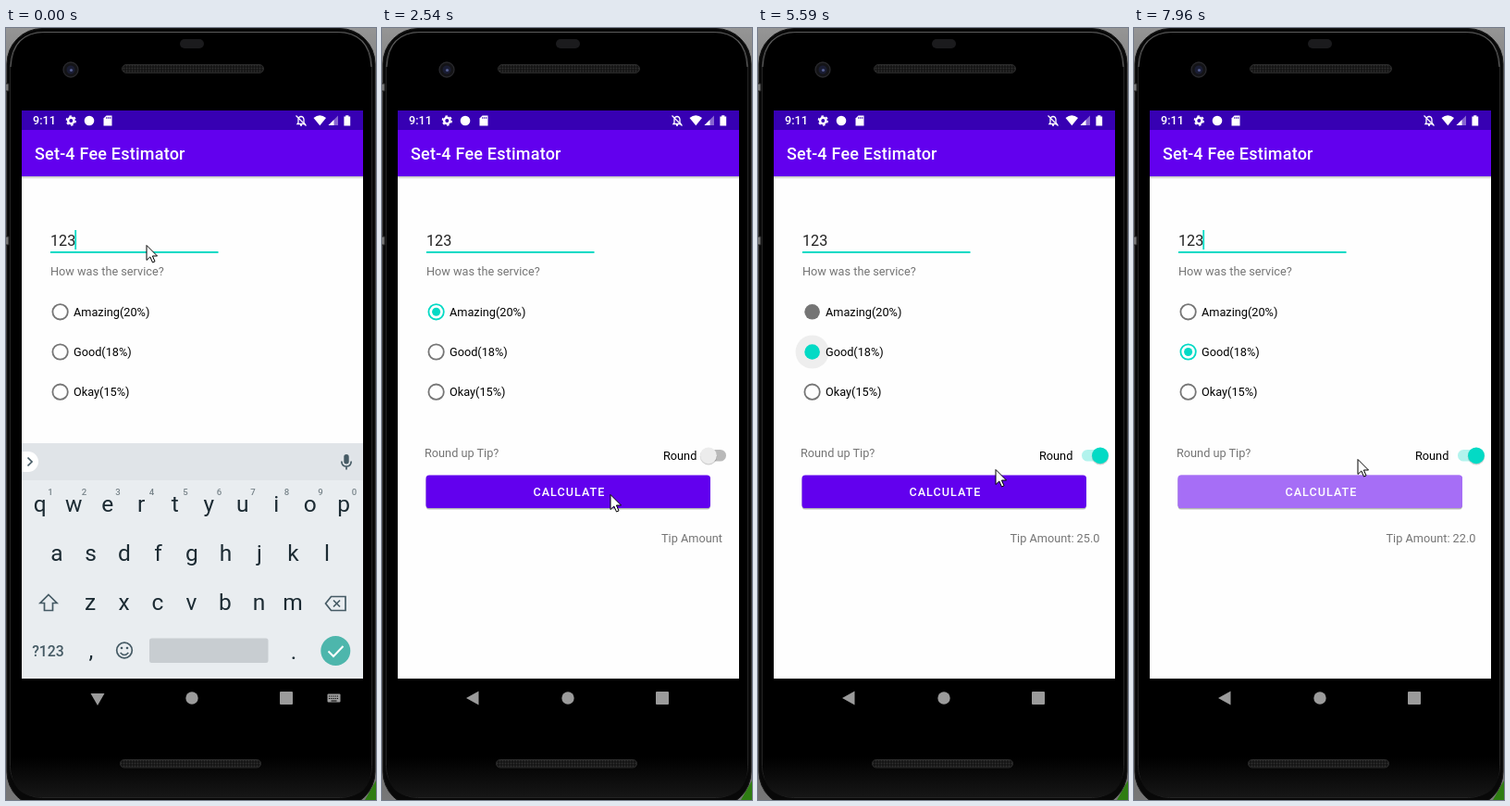
Animation, 400 px wide and 833 px high, one loop 8 s. Source, as an HTML page:

```html
<!DOCTYPE html>
<html lang="en">
<head>
<meta charset="utf-8">
<title>Tip form</title>
<style>
html, body { margin: 0; width: 100%; height: 100%; overflow: hidden; background: #000; }
svg { display: block; width: 100%; height: 100%; font-family: Roboto, "Noto Sans", sans-serif; }
.body { font-size: 12.72px; }
.soft { fill: #757575; }
.line { fill: none; stroke: #455a64; stroke-width: 1.7; }
.key { font-size: 24.5px; fill: #1c2b33; text-anchor: middle; }
.hint { font-size: 9.6px; font-weight: 500; fill: #78848a; text-anchor: middle; }
</style>
</head>
<body>
<svg viewBox="0 0 400 833" preserveAspectRatio="none">
  <defs>
    <linearGradient id="edge" x2="0" y2="1">
      <stop offset="0" stop-color="#959595"/><stop offset=".12" stop-color="#707070"/>
      <stop offset=".8" stop-color="#5c5c5c"/><stop offset="1" stop-color="#777"/>
    </linearGradient>
    <linearGradient id="chin" x2="0" y2="1">
      <stop offset=".5" stop-color="#000"/><stop offset="1" stop-color="#161616"/>
    </linearGradient>
    <linearGradient id="drop" x2="0" y2="1">
      <stop offset="0" stop-opacity=".26"/><stop offset="1" stop-opacity="0"/>
    </linearGradient>
    <pattern id="mesh" width="3" height="3" patternUnits="userSpaceOnUse">
      <rect width="3" height="3" fill="#141414"/><circle cx="1.5" cy="1.5" r=".9" fill="#303030"/>
    </pattern>
    <clipPath id="screen"><rect x="17" y="89" width="369" height="613"/></clipPath>
  </defs>

  <g id="phone">
    <rect width="400" height="833" fill="url(#edge)"/>
    <path d="M388 833L400 812V833Z" fill="#2f7d12"/>
    <rect x="1" y=".5" width="398" height="840" rx="38" fill="#080808" stroke="#161616"/>
    <rect x="4.5" y="4.5" width="391" height="826" rx="34" fill="#000" stroke="#242424"/>
    <path d="M5 42Q7 4.500 42 4.500H358Q393 4.500 395 42" fill="none" stroke="#5a5a5a" stroke-width="1.200"/>
    <path d="M5.5 743H395V797Q395 830 362 830H38Q5.5 830 5.5 797Z" fill="url(#chin)"/>
    <path d="M0 60h3v8H0M0 225h3v9H0" fill="#777" stroke="#222"/>
    <rect x="188" y="12" width="26" height="10" rx="5" fill="#1b1b1d"/>
    <rect x="125.500" y="39.500" width="153" height="9" rx="4.5" fill="url(#mesh)" stroke="#2b2b2b"/>
    <rect x="123.500" y="789.500" width="152" height="8.500" rx="4.2" fill="url(#mesh)" stroke="#2b2b2b"/>
    <circle cx="70" cy="45" r="8" fill="#141417" stroke="#29292d" stroke-width="1.300"/>
    <circle cx="70" cy="45" r="4.500" fill="#1a1d33"/><circle cx="70.500" cy="45.500" r="1.600" fill="#555f92"/>
  </g>

  <g clip-path="url(#screen)">
    <rect x="17" y="89" width="369" height="613" fill="#fefefe"/>
    <rect x="17" y="160" width="369" height="3" fill="url(#drop)"/>
    <rect x="17" y="110" width="369" height="50" fill="#6200ee"/>
    <rect x="17" y="89" width="369" height="21" fill="#3700b3"/>
    <text x="31" y="142" font-size="18" font-weight="500" letter-spacing=".22" fill="#fff">Set-4 Fee Estimator</text>

    <g id="status" fill="#fff">
      <text x="29" y="104.300" font-size="12.6" font-weight="500">9:11</text>
      <circle cx="70.300" cy="100" r="3.200" fill="none" stroke="#fff" stroke-width="2.400"/>
      <circle cx="70.300" cy="100" r="4.900" fill="none" stroke="#fff" stroke-width="1.500" stroke-dasharray="2.500 2.630"/>
      <circle cx="90" cy="100" r="5.300"/>
      <path d="M108.500 94.500H114.500V105.500H105.500V97.500Z"/>
      <path d="M108.800 96v2M110.800 96v2M112.800 96v2" stroke="#3700b3" stroke-width=".9"/>
      <path d="M315 103.500H323L322 102V98.500Q321.500 95.500 319 95.500T316 98.500V102ZM318 105h2" fill="none" stroke="#fff" stroke-width="1.300"/>
      <path d="M313.500 94.500L324.500 105.500" stroke="#fff" stroke-width="1.300"/>
      <path d="M332.500 97Q339.300 91.500 346 97L339.300 105.200Z"/>
      <path d="M359 94.500V105H348.500Z" opacity=".4"/><path d="M354.500 99V105H348.500Z"/>
      <path d="M367.200 94.200h3.200v1.200h1.800V105.500h-6.800V95.400h1.800Z"/>
    </g>

    <text x="48" y="235" font-size="16.2" fill="#212121">123</text>
    <path id="caret" d="M75.200 218V239" stroke="#03dac5" stroke-width="1.800"/>
    <path d="M48 242H229.500" stroke="#03dac5" stroke-width="2"/>
    <text class="body soft" x="48" y="266.800">How was the service?</text>
    <g id="radios"></g>

    <text class="body soft" x="46" y="463">Round up Tip?</text>
    <text class="body" x="304" y="466">Round</text>
    <circle id="switchRipple" cy="461.500" r="18" fill="#03dac5"/>
    <rect id="track" x="350" y="455" width="22" height="12.600" rx="6.300"/>
    <circle id="thumbShade" cy="462.200" r="9.200" opacity=".18"/>
    <circle id="thumb" cy="461.300" r="8.900"/>

    <rect x="47.500" y="485" width="307.500" height="35" rx="4" opacity=".12"/>
    <rect x="47.500" y="484" width="307.500" height="35" rx="3.600" opacity=".2"/>
    <rect x="47.500" y="482.500" width="307.500" height="35.500" rx="3.600" fill="#6200ee"/>
    <rect id="flash" x="47.500" y="482.500" width="307.500" height="35.500" rx="3.600" fill="#fff"/>
    <text x="202.400" y="505.200" font-size="12.57" font-weight="500" letter-spacing="1.02" fill="#fff" text-anchor="middle">CALCULATE</text>
    <text class="body soft" id="tip" y="555"></text>
    <g id="keyboard"></g>
  </g>

  <g id="nav" fill="#9b9b9b">
    <path id="back"/>
    <circle cx="201" cy="723" r="6.700"/>
    <rect x="296" y="716" width="14" height="14" rx="1"/>
    <g id="imeIcon">
      <rect x="347.500" y="718.500" width="14" height="9" rx="1"/>
      <path d="M349 721h11M349 723.500h11" stroke="#000" stroke-width="1.100" stroke-dasharray="1.200 1"/>
      <path d="M351.500 726h6" stroke="#000"/>
    </g>
  </g>
  <path id="cursor" d="M0 .5V16.500L3.800 13 6.500 19 9 17.900 6.400 12H11.500Z" fill="#fff" stroke="#000" stroke-linejoin="round"/>
</svg>

<script>
const LOOP = 8000;
const TEAL = [3, 218, 197];
const $ = id => document.getElementById(id);
const set = (el, attrs) => { for (const k in attrs) el.setAttribute(k, attrs[k]); };
const show = (el, on) => el.setAttribute('visibility', on ? 'visible' : 'hidden');
const clamp = x => Math.max(0, Math.min(1, x));
const mix = (a, b, p) => a + (b - a) * p;
const rgb = (a, b, p) => `rgb(${a.map((v, i) => Math.round(mix(v, b[i], p)))})`;

// Screen refreshes come in bursts: first time, last time, count
const bursts = [
  [120, 630, 5], [910, 1540, 6], [1690, 1840, 2], [1990, 2540, 5], [2690, 2990, 3],
  [3110, 3470, 4], [3770, 4740, 8], [4890, 5160, 3], [5440, 5590, 2], [5740, 6400, 6],
  [6520, 6910, 4], [7060, 7450, 4], [7570, 7960, 4]
];
const ticks = [0];
for (const [from, to, n] of bursts)
  for (let i = 0; i < n; i++) ticks.push(Math.round(mix(from, to, i / (n - 1))));

// Pointer path: time, x, y
const path = [
  [0, 152, 234], [120, 170, 242], [250, 150, 264], [500, 60, 309], [630, 54, 313],
  [1160, 54, 313], [1290, 150, 420], [1540, 347, 648], [1690, 358, 664], [1840, 360, 669],
  [2110, 360, 669], [2400, 270, 530], [2540, 247, 503], [2990, 247, 503],
  [3230, 300, 488], [3470, 353, 471], [3910, 353, 471], [4320, 257, 500],
  [4460, 255, 500], [4740, 86, 345], [5160, 64, 346], [5440, 64, 346],
  [5590, 257, 476], [5740, 350, 465], [6000, 357, 465], [6270, 262, 503],
  [6400, 257, 508], [6520, 257, 508], [6910, 365, 470], [7450, 360, 466],
  [7570, 358, 466], [7830, 246, 490], [7960, 242, 465]
];
const presses = [2840, 4320, 6520, 7830];
const toggles = [3690, 5860, 7490];
const tips = [
  [0, '', 302], [2990, ': 24.6', 272.500], [4460, ': 25.0', 272.500],
  [6640, ': 22.140001', 239], [7960, ': 22.0', 272.500]
];
const picks = [[910, 0], [5440, 1]];

const last = (list, t) => list.filter(row => row[0] <= t).pop();

function along(rows, t) {
  const i = rows.findIndex(r => r[0] > t);
  if (i < 0) return rows[rows.length - 1].slice(1);
  if (i === 0) return rows[0].slice(1);
  const a = rows[i - 1], b = rows[i], p = (t - a[0]) / (b[0] - a[0]);
  return a.slice(1).map((v, k) => mix(v, b[k + 1], p));
}

$('radios').innerHTML = ['Amazing(20%)', 'Good(18%)', 'Okay(15%)'].map((label, i) => {
  const y = 306.300 + i * 43.200;
  return `<circle cx="58.600" cy="${y}" r="18" fill="#eee"/>
    <circle cx="58.600" cy="${y}" r="8.200" fill="none" stroke-width="1.800"/>
    <circle cx="58.600" cy="${y}"/>
    <text class="body" x="73" y="${y + 4.700}">${label}</text>`;
}).join('');
const radios = [0, 1, 2].map(i => [...$('radios').children].slice(i * 4, i * 4 + 3));

function buildKeyboard() {
  const row = (keys, x, y, cls = 'key') => [...keys].map((k, i) =>
    `<text class="${cls}" x="${x + i * 36.500}" y="${y}">${k}</text>`).join('');
  $('keyboard').innerHTML = `
    <rect x="17" y="448" width="369" height="254" fill="#e9edf0"/>
    <rect x="17" y="448" width="369" height="40" fill="#e0e4e8"/>
    <path d="M17 457H24A11 11 0 0 1 24 479H17Z" fill="#fff"/>
    <path class="line" d="M23.500 463.500L28 468 23.500 472.500"/>
    <rect x="365.300" y="460" width="5.400" height="10.500" rx="2.700" fill="#455a64"/>
    <path class="line" d="M362.800 467.500Q363 473 368 473T373.200 467.500M368 473V476.500" stroke-width="1.500"/>
    ${row('qwertyuiop', 36.700, 522)}${row('asdfghjkl', 55, 574.500)}${row('zxcvbnm', 91, 627.500)}
    ${row('1234567890', 48, 504, 'hint')}
    <path class="line" d="M46 611.500L55 620.500H50.500V628.500H41.500V620.500H37Z"/>
    <path class="line" d="M351.500 613.500H367V628.500H351.500L345.500 621ZM354 617.500L361 624.500M361 617.500L354 624.500"/>
    <text x="45.500" y="677.500" font-size="15.800" font-weight="500" fill="#455a64" text-anchor="middle">?123</text>
    <text class="key" x="92" y="679.500">,</text><text class="key" x="311" y="680.500">.</text>
    <circle class="line" cx="128" cy="671.500" r="8.300"/>
    <path class="line" d="M123.700 674Q128 679 132.300 674"/>
    <circle cx="125" cy="669" r="1.300" fill="#455a64"/><circle cx="131" cy="669" r="1.300" fill="#455a64"/>
    <rect x="155" y="658.500" width="128.500" height="26.500" rx="2.500" fill="#c8cdd1"/>
    <circle id="done" cx="356.300" cy="672" r="16"/>
    <path d="M348.500 672.500L354 678 364.500 667" fill="none" stroke="#fff" stroke-width="2"/>`;
}
buildKeyboard();

function drawRadios(t) {
  const now = last(picks, t);
  const before = now && picks[picks.indexOf(now) - 1];
  const age = now ? t - now[0] : Infinity;
  const settled = age > 280;
  radios.forEach(([ripple, ring, dot], i) => {
    const isNew = !!now && now[1] === i;
    const isOld = !!before && before[1] === i;
    const on = isNew ? age >= 60 : isOld && age < 60;
    const color = on ? `rgb(${TEAL})` : '#757575';
    const disc = age >= 60 && !settled && (isNew || isOld);
    set(ripple, { opacity: isNew ? (settled ? clamp((420 - age) / 200) : 1) : 0 });
    set(ring, { stroke: color, visibility: disc ? 'hidden' : 'visible' });
    set(dot, { fill: color, r: disc ? 8.300 : on ? 4.500 : 0 });
  });
}

function drawSwitch(t) {
  let v = 0;
  toggles.forEach((at, i) => {
    const p = clamp((t - at) / 140);
    if (t >= at) v = i % 2 ? 1 - p : p;
  });
  const x = mix(353, 370, v);
  const age = t - toggles[2];
  set($('track'), { fill: rgb([185, 185, 185], [178, 243, 237], v) });
  set($('thumb'), { cx: x, fill: rgb([236, 236, 236], TEAL, v) });
  set($('thumbShade'), { cx: x });
  set($('switchRipple'), { cx: x, opacity: age >= 0 && age < 250 ? .15 : 0 });
}

function draw(t) {
  const [x, y] = along(path, t);
  set($('cursor'), { transform: `translate(${x} ${y})` });

  const blink = t % 1000;
  show($('caret'), blink < 380 || blink >= 880);

  const press = presses.filter(p => p <= t).pop();
  const glow = press === undefined ? 0
    : along([[0, .12], [130, .43], [260, .2], [380, 0]], t - press)[0];
  set($('flash'), { opacity: glow });

  const [, amount, left] = last(tips, t);
  $('tip').textContent = 'Tip Amount' + amount;
  set($('tip'), { x: left });

  const typing = t < 2110;
  show($('keyboard'), typing);
  show($('imeIcon'), typing);
  set($('back'), { d: typing ? 'M91.500 718H106.500L99 731Z' : 'M91 723L104.500 715.500V730.500Z' });
  set($('done'), { fill: t >= 1840 && t < 1990 ? '#3fa097' : '#4db6ac' });

  drawRadios(t);
  drawSwitch(t);
}

const start = performance.now();
function frame() {
  const t = (performance.now() - start) % LOOP;
  draw(ticks.filter(k => k <= t).pop());
  requestAnimationFrame(frame);
}
frame();
</script>
</body>
</html>
```
